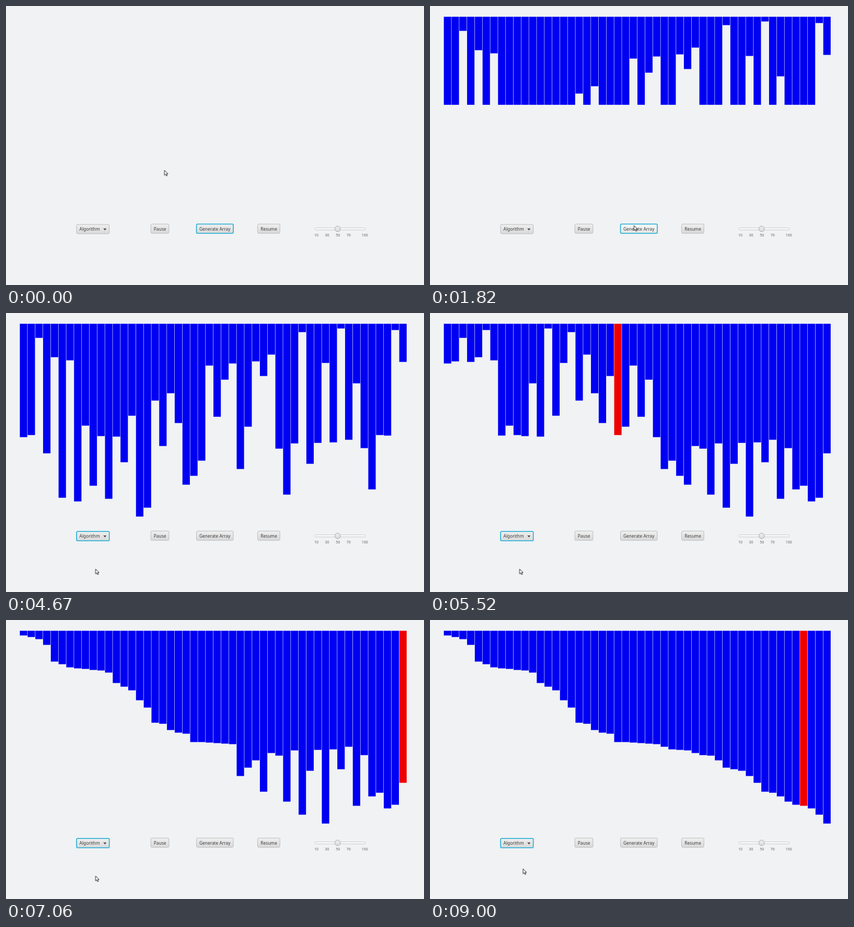
An HTML page for the animation above (9030 ms loop, 800 px wide and 534 px high).

```html
<!DOCTYPE html>
<html lang="en">
<head>
<meta charset="utf-8">
<title>Sorting visualizer</title>
<style>
  html, body { margin: 0; width: 100%; height: 100%; overflow: hidden; background: #f0f2f4; }
  svg { display: block; width: 800px; height: 534px; }
  text { font-family: "Noto Sans", "Open Sans", sans-serif; font-size: 8.35px; fill: #3c3c3c; }
  .tick { font-size: 7px; fill: #606060; text-anchor: middle; }
  .edge { fill: url(#face); stroke: #b9bbbd; stroke-width: 1; }

  #generate .edge { animation: generate 9030ms step-end infinite; }
  #algorithm .edge { animation: algorithm 9030ms step-end infinite; }
  #menu { animation: menu 9030ms step-end infinite; }
  #pick { animation: pick 9030ms step-end infinite; }
  #cursor { animation: cursor 9030ms ease-in-out infinite; }

  @keyframes generate {
    0% { stroke: #35b3d6; stroke-width: 1.8; fill: url(#face); }
    6.2% { stroke: #35b3d6; stroke-width: 1.8; fill: url(#light); }
    34.9% { stroke: #35b3d6; stroke-width: 1.8; fill: url(#face); }
    42.3%, 100% { stroke: #b9bbbd; stroke-width: 1; fill: url(#face); }
  }
  @keyframes algorithm {
    0% { stroke: #b9bbbd; stroke-width: 1; }
    42.3%, 100% { stroke: #35b3d6; stroke-width: 1.8; }
  }
  @keyframes menu {
    0%, 50.9%, 100% { visibility: hidden; }
    42.3% { visibility: visible; }
  }
  @keyframes pick {
    0% { transform: none; opacity: 0; }
    44.6% { transform: none; opacity: 1; }
    46% { transform: translateY(19.5px); opacity: 1; }
    47.1%, 100% { transform: translateY(39px); opacity: 1; }
  }
  @keyframes cursor {
    0%, 1.1% { transform: translate(303.2px, 314.4px); }
    7.2%, 33.8% { transform: translate(390.4px, 420.2px); }
    40.4%, 43.2% { transform: translate(166px, 426px); }
    48.7%, 93.6% { transform: translate(171.4px, 489.9px); }
    98%, 100% { transform: translate(178.1px, 476.2px); }
  }
</style>
</head>
<body>
<svg viewBox="0 0 800 534">
  <defs>
    <linearGradient id="face" x2="0" y2="1">
      <stop offset="0" stop-color="#efefef"/>
      <stop offset="1" stop-color="#d9d9d9"/>
    </linearGradient>
    <linearGradient id="light" x2="0" y2="1">
      <stop offset="0" stop-color="#f8f8f8"/>
      <stop offset="1" stop-color="#e6e6e6"/>
    </linearGradient>
  </defs>

  <g id="bars"></g>

  <g id="algorithm">
    <rect class="edge" x="135.1" y="418.1" width="62.6" height="17.8" rx="2"/>
    <text x="140.6" y="430.2">Algorithm</text>
    <path d="M186.2 425.8h6.2l-3.1 3.6z" fill="#4a4a4a"/>
  </g>
  <g>
    <rect class="edge" x="277.2" y="417.3" width="34.6" height="17.8" rx="2"/>
    <text x="282.8" y="429.6">Pause</text>
  </g>
  <g id="generate">
    <rect class="edge" x="364.6" y="417.3" width="70.4" height="17.8" rx="2"/>
    <text x="370" y="429.6">Generate Array</text>
  </g>
  <g>
    <rect class="edge" x="481.6" y="417.3" width="42.6" height="17.8" rx="2"/>
    <text x="487.3" y="429.6">Resume</text>
  </g>

  <rect x="591.3" y="424.6" width="96.4" height="4" rx="2" fill="#fafafa" stroke="#c2c4c6" stroke-width=".9"/>
  <circle cx="634.7" cy="426.6" r="5.3" fill="url(#face)" stroke="#a4a6a8"/>
  <g id="ticks"></g>

  <g id="menu">
    <rect x="135" y="437" width="63" height="61" fill="#f4f4f4" stroke="#c4c4c4" stroke-width=".7"/>
    <rect id="pick" x="135.4" y="438.5" width="62.2" height="19" fill="#9fd6ea"/>
    <text x="141" y="451">Bubble Sort</text>
    <text x="141" y="470.5">Merge Sort</text>
    <text x="141" y="490">Quick Sort</text>
  </g>

  <path id="cursor" d="M0 0V9.4L2.2 7.4L3.8 10.8L5.4 10.1L3.9 6.8H6.8Z" fill="#fff" stroke="#111" stroke-width=".95"/>
</svg>

<script>
const LOOP = 9030, TOP = 20.6;
const LEFT = 26.5, PITCH = 14.82, WIDTH = 14.15;
const GROW_START = 890, GROW_SPEED = 0.181;
const SORT_START = 4776, SWAP_TIME = 51.4;

// the array to sort
const values = [
  217, 213, 27, 248, 64, 333, 70, 340, 195, 310, 215, 335, 216, 265, 176, 369, 352,
  147, 234, 133, 190, 308, 291, 262, 80, 178, 107, 76, 278, 197, 72, 100, 59, 239,
  327, 229, 16, 268, 228, 75, 227, 9, 222, 114, 238, 317, 213, 214, 12, 73
];

function add(parent, name, attrs) {
  const el = document.createElementNS("http://www.w3.org/2000/svg", name);
  for (const key in attrs) el.setAttribute(key, attrs[key]);
  return document.getElementById(parent).appendChild(el);
}

function swap(a, [i, j]) {
  [a[i], a[j]] = [a[j], a[i]];
}

// quicksort with the first item as pivot; returns every swap made
function quickSwaps(list) {
  const a = list.slice(), swaps = [];
  const move = (i, j) => {
    swap(a, [i, j]);
    swaps.push([i, j]);
  };
  const sort = (lo, hi) => {
    if (lo >= hi) return;
    let i = lo + 1, j = hi;
    while (true) {
      while (i <= hi && a[i] <= a[lo]) i++;
      while (j > lo && a[j] > a[lo]) j--;
      if (i >= j) break;
      move(i, j);
    }
    move(lo, j);
    sort(lo, j - 1);
    sort(j + 1, hi);
  };
  sort(0, a.length - 1);
  return swaps;
}

const swaps = quickSwaps(values);
const bars = values.map((_, i) => add("bars", "rect", { x: LEFT + PITCH * i, y: TOP, width: WIDTH }));

for (const n of [10, 30, 50, 70, 100]) {
  add("ticks", "text", { class: "tick", x: 583.7 + 1.031 * n, y: 440.7 }).textContent = n;
}

function draw(t) {
  const count = Math.max(0, Math.floor((t - SORT_START) / SWAP_TIME));
  const done = swaps.slice(0, count);
  const a = values.slice();
  done.forEach(pair => swap(a, pair));
  const red = done.length ? done[done.length - 1][1] : -1;
  const limit = Math.max(0, (t - GROW_START) * GROW_SPEED);
  bars.forEach((bar, i) => {
    bar.setAttribute("height", Math.min(a[i], limit));
    bar.setAttribute("fill", i === red ? "#ee0000" : "#0000f2");
  });
}

const start = performance.now();
function frame() {
  draw((performance.now() - start) % LOOP);
  requestAnimationFrame(frame);
}
frame();
</script>
</body>
</html>
```
